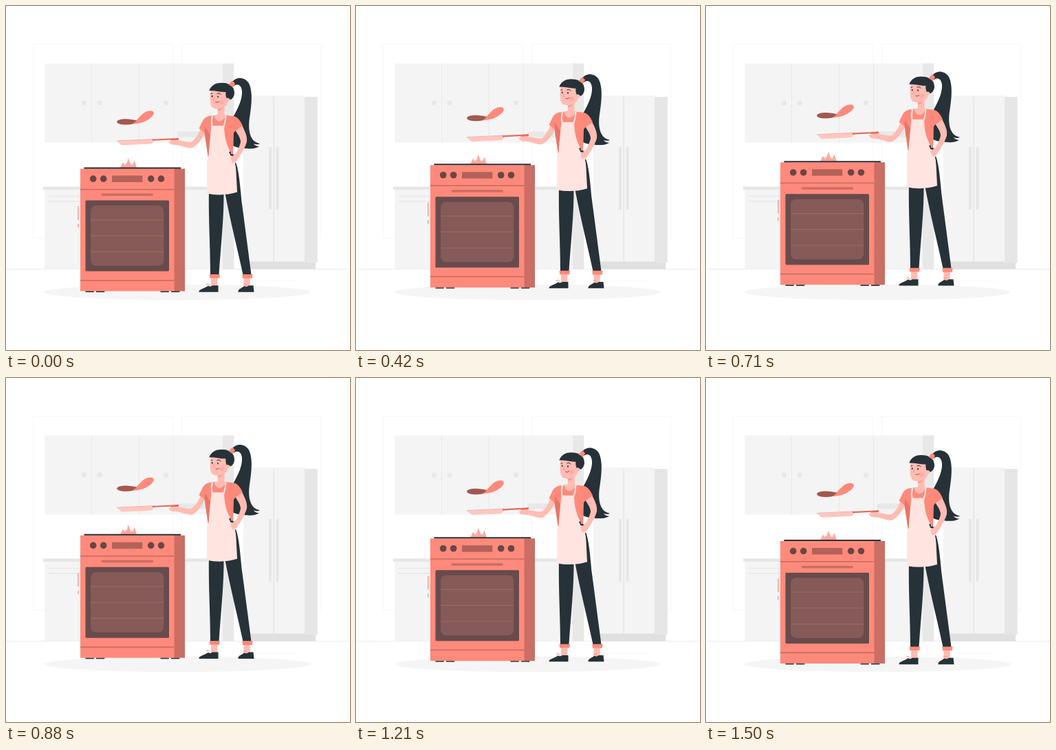
Recreate the animation shown at these times as an HTML page with a canvas. Size 500 px wide and 500 px high, loop 1540 ms.

```html
<!DOCTYPE html>
<html lang="en">
<head>
<meta charset="utf-8">
<title>Cooking</title>
<style>
html, body { margin: 0; width: 100%; height: 100%; overflow: hidden; background: #fff; }
canvas { display: block; width: 500px; height: 500px; }
</style>
</head>
<body>
<canvas id="stage"></canvas>
<script>
const LOOP = 1540, STEP = 1000 / 24, LIFT = 10, PHASE = 35;
const CORAL = '#ff8a7b', SHADE = '#cb6e63', DARK = '#263238', SKIN = '#ffbcb3', APRON = '#ffe4e0';

const canvas = document.getElementById('stage');
const ctx = canvas.getContext('2d');
const dpr = window.devicePixelRatio || 1;
canvas.width = canvas.height = 500 * dpr;

function rect(x, y, w, h, color, r = 0) {
  ctx.fillStyle = color;
  ctx.beginPath();
  ctx.roundRect(x, y, w, h, r);
  ctx.fill();
}

function oval(x, y, rx, ry, color) {
  ctx.fillStyle = color;
  ctx.beginPath();
  ctx.ellipse(x, y, rx, ry, 0, 0, Math.PI * 2);
  ctx.fill();
}

function fill(d, color) {
  ctx.fillStyle = color;
  ctx.fill(new Path2D(d));
}

function line(d, color, width = 1) {
  ctx.strokeStyle = color;
  ctx.lineWidth = width;
  ctx.stroke(new Path2D(d));
}

function drawKitchen() {
  rect(0, 0, 500, 500, '#fff');
  line('M39.5 55.5H242.5V337.5H39.5ZM255.5 55.5H457.5V337.5H255.5Z', '#f7f7f7');
  line('M0 382.5H500', '#ededed');
  line('M350 399.5H421', '#f7f7f7');

  // wall cabinets
  rect(56.5, 83.5, 258.5, 115, '#f4f4f4');
  rect(315, 83.5, 16.3, 115, '#e8e8e8');
  line('M124.5 83.5V198.5M193.5 83.5V198.5M243.5 83.5V198.5', '#e8e8e8');
  for (const x of [113.5, 136, 232.5]) oval(x, 141, 3.7, 3.7, '#e8e8e8');
  rect(249, 182.5, 61, 8, '#e8e8e8', 3);

  // base cabinets
  rect(56.5, 267, 258.5, 115.5, '#f4f4f4');
  rect(315, 267, 16.3, 115.5, '#e8e8e8');
  rect(54, 262.5, 279, 4.5, '#e6e6e6');
  line('M62 276.5H120M62 284H120', '#e8e8e8', 1.5);

  // fridge
  rect(353, 371, 97, 11.5, '#e0e0e0');
  rect(433, 132, 19.7, 241, '#e6e6e6');
  rect(345, 130, 89, 241.5, '#f4f4f4');
  line('M389.2 132V371.5', '#e2e2e2', 1.3);
  rect(382, 205, 4, 91, '#e6e6e6');
  rect(392.5, 205, 4, 91, '#e6e6e6');

  oval(249.5, 416, 193.5, 11.3, '#f5f5f5');
}

function drawStove() {
  rect(104, 291.5, 1.7, 20, '#ffa598', 1);
  rect(104, 317, 1.7, 5.5, '#ffa598', 1);
  fill('M166 235.5L170 227.5L173 232L174 228L175.5 230L177.5 221.5L182 232L183 230L184 231.5L186.5 225L190 235.5Z', '#ffa99f');
  for (const x of [115.5, 131, 224.5, 240]) rect(x, 414.5, 12.3, 2, DARK);
  rect(113.5, 235, 140.5, 2.5, DARK);
  rect(244, 237, 16, 178, SHADE);
  rect(108, 237, 136.5, 178, CORAL);
  line('M108 267H244.5M108 399.3H244.5', SHADE, 1.8);
  for (const x of [126.7, 141.7, 210.7, 225.5]) oval(x, 251.6, 4.8, 4.8, '#684746');
  rect(154, 247, 44.3, 9.5, '#b36259');
  rect(138.5, 273, 75.5, 3.5, SHADE, 1.7);
  rect(115.5, 283, 121.5, 103, '#684b4c', 1.5);
  rect(123, 290.5, 106.3, 87.5, '#855a58', 8);
  line('M123 311.3H229.3M123 334.3H229.3M123 357.6H229.3', '#a0675e', 1.2);
}

function drawPan() {
  fill('M184 172C193 165 199 152.5 210 152.8C217 153.2 215.5 158.5 211.5 162C203 169.5 194 171.5 184 172Z', CORAL);
  fill('M161 168.8C163 162.5 183 164.6 190 166.8Q187 170.2 184 172C177 173.5 162.5 174 161 168.8Z', '#a3584f');
  fill('M161 196.5L216 194L217 196C213 198 214 200.5 209 201L168 202.8Z', '#ffc7bf');
  line('M161 196.5L215 193.9', '#f7b3aa', 1);
  line('M213 195.2L251 193.3', '#e36c60', 2.2);
}

function drawLegs() {
  for (const x of [0, 47.5]) {
    fill(`M${298 + x} 394H${307.5 + x}L${307 + x} 410H${298 + x}Z`, SKIN);
  }
  fill('M280.5 416.2C280 412 288 411.5 294 407Q297 409.5 300 406.8H308.5V416.2Z', DARK);
  fill('M337.5 416.2C337 412 342 411 346.5 407.5Q350 409.5 353 406.8H359.5L360.5 416.2Z', DARK);
  line('M291 405Q295 403 297 407M345 405.5Q348 403 350 407', CORAL, 1);
  fill('M334 228C339 240 341 270 343 288L356.5 391H344.5C338 360 326 313 318.5 273L316.5 268C317 310 312 350 309.5 391H297C297 350 294 310 295 265Z', DARK);
  fill('M295.5 390.5H311L310.2 396H296.3ZM343.2 390.5H358.7L357.8 396.3H344Z', CORAL);
}

function drawBody() {
  // ponytail
  fill('M328 112C333 104 345 102 352.5 112C359 123 357 144 354.5 160C351 180 354 198 369 200.5C366 202.5 362 201.5 359.5 200.5C362 203.5 366 205 368.5 204.5C362 208.5 351 208.5 346 207C340 207.5 334 206 330 203.5L329 165C332 157 344 140 343 124C342 115 336 112.5 331 117Z', DARK);

  // arms
  fill('M284 176C280 187 275 194 270 198C263 199 257 196 251 196.2L247 193.5Q241 191 238 193.5Q241 195 241 196L236.5 197.5Q238 202 244 202.3C253 202 262 207.5 270 207C279 203 285 193 290 184Z', SKIN);
  line('M239 194.4L251 193.7', '#e36c60', 2.4);
  fill('M343 174C348 184 351 190 350 198C347 208 341 217 337 223Q334 229 329 228L325 222Q328 217 334 215C337 209 341 202 341 197C340 190 335 185 333 180Z', SKIN);

  // blouse
  fill('M300 159.5C292 160.5 288 163 285.5 168L280.5 178.5L289 185L293.5 220H330L331 185L333.5 182L344 174.5C340 166 336 161 330 160.5L317 159Z', CORAL);
  fill('M289 175L288.5 185L294 220H296Q297 200 297 188Z', '#e87668');

  // neck
  fill('M307.5 146L318 143L317.5 158.5L319 160Q316 167.5 310 168.5Q304 167 302.5 160L308 158Z', SKIN);
  fill('M308 149.5Q313 149 317 145Q315 152 308 153Z', '#ff9a8d');

  // apron
  line('M300 159.5Q298 168 299.5 176M319.5 159.5Q319 169 316.5 176', APRON, 2);
  fill('M298.5 174.5H317C317.5 195 322 204 327 214Q334 226 334.5 241L336 271Q314 277.5 292 273V225Q295 219 295 211Z', APRON);
  fill('M324 212.5L326.5 212L327 215.5L330.5 216L331 219L326.5 218Z', DARK);
  fill('M326 221Q329 217.5 335 217L337 222Q334 229 329 228Z', SKIN);
}

function drawHead() {
  fill('M297.5 122C296 132 295.8 144 300 148C306 152 317 150 321 144L326 131L322 119Z', SKIN);
  oval(321.5, 136, 3.5, 4, SKIN);
  oval(313.5, 140.5, 3.6, 2.8, '#ffaaa3');
  oval(299.7, 131.7, 0.9, 1.4, DARK);
  oval(308, 132.3, 0.9, 1.4, DARK);
  line('M306.5 127.8Q310 126 312.3 129M297.7 128.2L300.2 127.5', DARK, 1);
  line('M303 132.5L301.3 137.2L303.2 137.6', '#ff8a7b', 0.8);
  line('M304.5 140Q307.5 142 310 139', '#a3423a', 1);
  fill('M295.3 123.5C299 113.5 308 111.5 315 112.3C326 112.5 332.5 119 332 128Q331 134.5 326 136.8Q324 133 320.5 134.5Q319 130 319.3 125.5C312 126 304 123 295.3 123.5Z', DARK);
  fill('M323.5 115L328 109.5Q331.5 110 333 113.5L329.5 119Q327 116 323.5 115Z', CORAL);
}

function draw(now) {
  const ms = Math.floor((now % LOOP) / 10) * 10;
  const frame = Math.floor((ms + 5) / STEP);
  const phase = ((frame * STEP + PHASE) / LOOP) % 1;
  const lift = LIFT * (1 - Math.abs(1 - 2 * phase));

  ctx.setTransform(dpr, 0, 0, dpr, 0, 0);
  drawKitchen();
  ctx.translate(0, -lift);
  drawStove();
  drawLegs();
  drawPan();
  drawBody();
  drawHead();
}

const start = performance.now();
function tick() {
  draw(performance.now() - start);
  requestAnimationFrame(tick);
}
tick();
</script>
</body>
</html>
```
